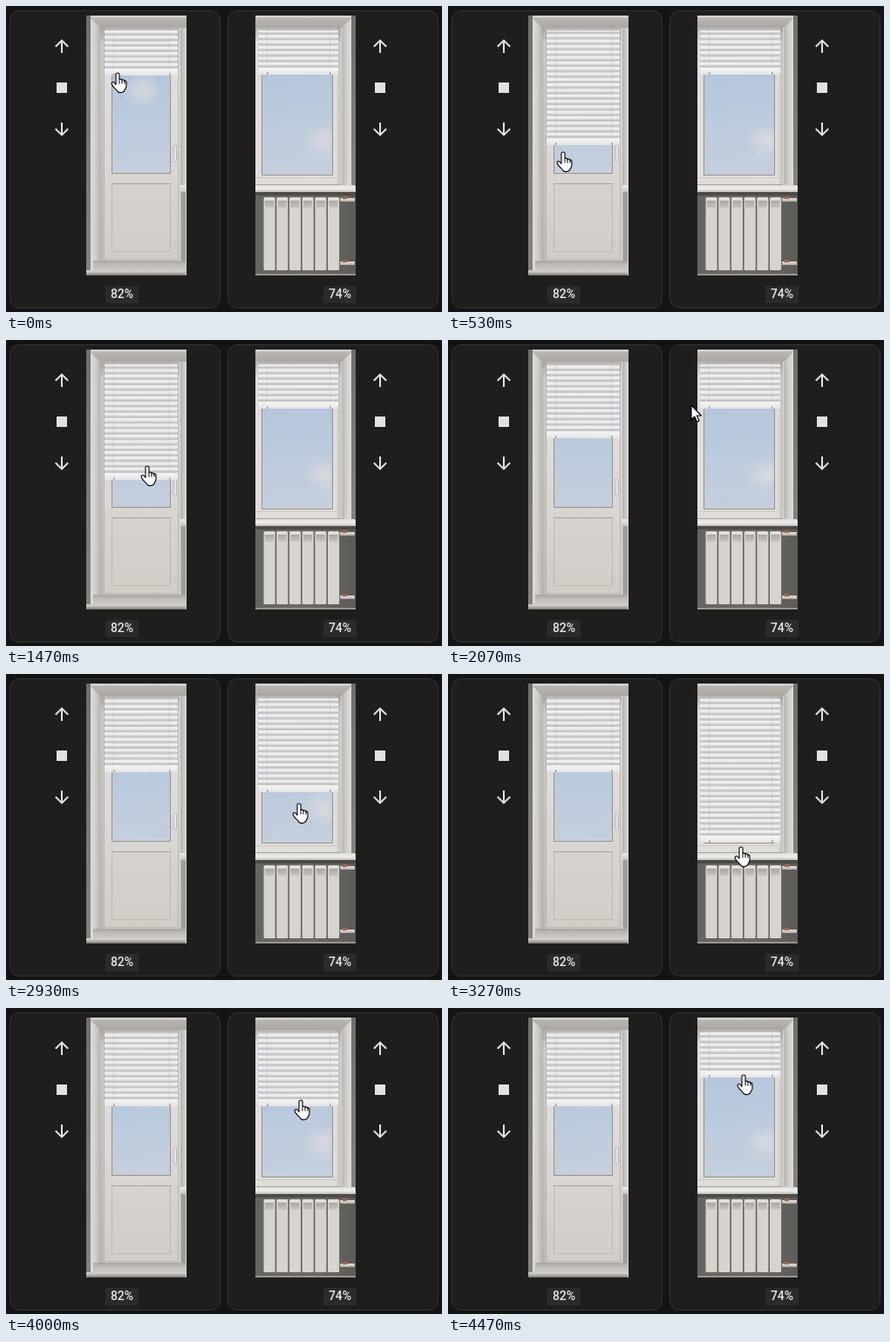
These frames come from a looping animation (500x352 px, 4590 ms). An HTML page with a canvas:

```html
<!DOCTYPE html>
<html lang="en">
<head>
<meta charset="utf-8">
<title>Window blinds</title>
<style>
  html, body { margin: 0; width: 100%; height: 100%; overflow: hidden; background: #141414; }
  canvas { display: block; width: 500px; height: 352px; }
</style>
</head>
<body>
<canvas id="stage" width="500" height="352"></canvas>
<script>
const ctx = document.getElementById('stage').getContext('2d');
const LOOP = 4590, FPS = 15;
const BLIND_TOP = 28, LAG = 30;
const LEFT_RELEASE = 1625, RIGHT_GRAB = 2740;

// Pointer stops; it eases from one to the next
const stops = [
  { t: 130, x: 128, y: 77 },
  { t: 1050, x: 137, y: 300 },
  { t: LEFT_RELEASE, x: 168, y: 110 },
  { t: 1750, x: 175, y: 74 },
  { t: 2280, x: 336, y: 75 },
  { t: RIGHT_GRAB, x: 336, y: 76 },
  { t: 3095, x: 336, y: 205 },
  { t: 4400, x: 339, y: 77 }
];

const clamp = (v, lo, hi) => Math.min(hi, Math.max(lo, v));
const smooth = u => u * u * (3 - 2 * u);

function pointerAt(t) {
  const next = stops.findIndex(s => s.t > t);
  if (next === 0) return stops[0];
  if (next < 0) return stops[stops.length - 1];
  const a = stops[next - 1], b = stops[next], s = smooth((t - a.t) / (b.t - a.t));
  return { x: a.x + (b.x - a.x) * s, y: a.y + (b.y - a.y) * s };
}

// A blind trails the pointer while it is held
function blindBottom(t, grab, release, limit) {
  return Math.round(Math.min(limit, pointerAt(clamp(t - LAG, grab, release)).y + 3));
}

function rect(x, y, w, h, fill) {
  ctx.fillStyle = fill;
  ctx.fillRect(x, y, w, h);
}

function outline(x, y, w, h, color) {
  ctx.strokeStyle = color;
  ctx.lineWidth = 1;
  ctx.strokeRect(x + .5, y + .5, w - 1, h - 1);
}

function ramp(x, y, w, h, dx, dy, ...colors) {
  const g = ctx.createLinearGradient(x, y, x + w * dx, y + h * dy);
  colors.forEach((c, i) => g.addColorStop(i / (colors.length - 1), c));
  rect(x, y, w, h, g);
}
const across = (x, y, w, h, ...colors) => ramp(x, y, w, h, 1, 0, ...colors);
const down = (x, y, w, h, ...colors) => ramp(x, y, w, h, 0, 1, ...colors);

function roundBox(x, y, w, h, r, fill, stroke) {
  ctx.beginPath();
  ctx.roundRect(x, y, w, h, r);
  ctx.fillStyle = fill;
  ctx.fill();
  if (!stroke) return;
  ctx.strokeStyle = stroke;
  ctx.lineWidth = 1;
  ctx.stroke();
}

function at(x, y, draw, scaleX = 1) {
  ctx.save();
  ctx.translate(x, y);
  ctx.scale(scaleX, 1);
  draw();
  ctx.restore();
}

function clipped(x, y, w, h, draw) {
  ctx.save();
  ctx.beginPath();
  ctx.rect(x, y, w, h);
  ctx.clip();
  draw();
  ctx.restore();
}

const arrowUp = new Path2D('M1 8H-1V-4L-6.5 1.5L-7.92 .08L0 -7.84L7.92 .08L6.5 1.5L1 -4Z');

function card(x, iconX, labelX, label) {
  roundBox(x + .5, 5.5, 241, 342, 11, '#1e1e1e', '#343434');
  ctx.fillStyle = '#e1e1e1';
  at(iconX, 46, () => ctx.fill(arrowUp));
  ctx.fillRect(iconX - 6, 88, 12, 12);
  at(iconX, 142, () => { ctx.rotate(Math.PI); ctx.fill(arrowUp); });
  roundBox(labelX - 19, 322, 38, 20, 2, '#2b2b2b');
  ctx.fillStyle = '#e6e6e6';
  ctx.font = '500 14px Roboto, sans-serif';
  ctx.textAlign = 'center';
  ctx.fillText(label, labelX, 336);
}

// Wall strip, reveal and inner shadows; the outer wall is on the left
function recess(height) {
  rect(0, 0, 115, height, '#d9d7d4');
  down(5, 0, 110, 3, '#dcdad7', '#c4c1bd');
  down(5, 3, 110, 11, '#b9b6b2', '#aaa7a2');
  ctx.beginPath();
  [[5, 3], [16, 14], [16, height], [5, height]].forEach(p => ctx.lineTo(...p));
  ctx.clip();
  across(5, 0, 11, height, '#dfddda', '#d0cdca', '#b9b6b2');
}

function wallStrip(height) {
  down(0, 0, 5, height, '#716f6b', '#85827d');
}

function innerShadow(x, y, w, h) {
  down(x, y, w, 18, 'rgba(80,76,70,.28)', 'rgba(80,76,70,0)');
  across(x, y, 6, h, 'rgba(80,76,70,.2)', 'rgba(80,76,70,0)');
}

function cloud(x, y, size) {
  for (let i = 0; i < 5; i++) {
    const px = x + Math.sin(i * 2.4) * size * .6, py = y + Math.cos(i * 2.4) * size * .45;
    const g = ctx.createRadialGradient(px, py, 0, px, py, size);
    g.addColorStop(0, 'rgba(222,220,223,.4)');
    g.addColorStop(1, 'rgba(222,220,223,0)');
    rect(px - size, py - size, size * 2, size * 2, g);
  }
}

function glass(x, y, w, h, cloudX, cloudY) {
  clipped(x, y, w, h, () => {
    ramp(x, y, w, h, .3, 1, '#b1c3db', '#b9c9dd', '#c5cfdc');
    cloud(cloudX, cloudY, 15);
  });
  outline(x, y, w, h, '#95918b');
}

function blind(x, w, bottom) {
  const pitch = 6.3, rail = bottom - 8;
  const cords = [x + 10, x + w - 10];
  clipped(x, BLIND_TOP, w, bottom - BLIND_TOP, () => {
    for (let y = rail - pitch; y > BLIND_TOP - pitch; y -= pitch) {
      down(x, y, w, pitch, '#f2f2f3', '#efeff0', '#e2e2e4', '#bebec1', '#d4d4d6');
    }
    cords.forEach(cx => rect(cx, BLIND_TOP, 1, rail - BLIND_TOP, 'rgba(150,150,155,.2)'));
    down(x, rail, w, 8, '#f3f3f3', '#eeeeee', '#e3e3e3');
  });
  cords.forEach(cx => rect(cx, bottom - 3, 1.5, 3, '#a8a49f'));
}

function door(bottom) {
  at(92, 11, () => {
    ctx.save();
    recess(299);
    ctx.restore();
    wallStrip(294);
  });
  across(200, 25, 6, 268, '#b5b2ae', '#d6d3d0');
  down(108, 25, 91, 268, '#dcdbda', '#d6d3cf', '#cbc7c2');
  down(112, 28, 86, 264, '#e2e1e0', '#dcd9d6', '#d0ccc7');
  outline(112, 28, 86, 264, '#bcb8b3');
  innerShadow(108, 25, 91, 268);
  glass(121, 40, 68, 153, 156, 97);
  down(121, 204, 68, 79, '#d6d2cd', '#d1cdc7');
  outline(121, 204, 68, 79, '#bdb9b3');
  rect(121, 204, 68, 1, '#a5a19b');
  roundBox(192, 160, 3.5, 19, 1.5, '#e6e4e1', '#b9b6b1');

  rect(201, 214, 5, 79, '#a19e99');
  down(200, 206, 6, 8, '#efeeec', '#c5c2be');
  down(100, 293, 106, 11, '#a9a6a1', '#c2bfbb', '#cccac6');
  down(92, 304, 114, 6, '#d9d6d2', '#b8b4ae', '#77736d');
  blind(113, 84, bottom);
}

function radiator() {
  across(286, 214, 115, 96, '#666460', '#6c6a66', '#5e5c58');
  rect(286, 214, 115, 4, '#4d4b48');
  rect(286, 308, 115, 2, '#98958f');
  for (const y of [223, 296]) {
    down(382, y - 2, 18, 4, '#e8e5e1', '#aeaaa5');
    rect(386, y - 4, 5, 3, '#a0664d');
  }
  const pitch = 14.7;
  rect(295, 221, pitch * 6, 82, '#5f5b56');
  for (let i = 0; i < 6; i++) {
    const x = 295.5 + i * pitch;
    roundBox(x, 220, 13.2, 84, 1.5, '#d7d3ce');
    rect(x + 1, 221, 11, 2, '#e5e2de');
    down(x + 1.5, 224, 10, 8, '#aaa6a1', '#c8c4bf');
  }
}

function windowPhoto(bottom) {
  at(401, 11, () => {
    ctx.save();
    recess(299);
    ctx.restore();
    wallStrip(196);
  }, -1);
  down(286, 25, 98, 181, '#dddcdb', '#dfddda', '#e0ddd9');
  at(384, 0, () => innerShadow(0, 25, 98, 181), -1);
  glass(293, 40, 82, 155, 363, 155);
  rect(286, 197, 98, 1, '#ccc9c5');
  rect(286, 205, 98, 1, '#a7a39f');
  radiator();
  down(286, 206, 114, 8, '#dedcd9', '#f0efed', '#c2bfba');
  blind(289, 92, bottom);
}

const hand = new Path2D('M-2 1.6C-2-.5 2-.5 2 1.6V8C2.5 6.6 5 6.8 5 8.6C5.6 7.4 8 7.8 8 9.6C8.6 8.6 10 9.2 10 11V15C10 18 8 19 7.5 21Q3.5 24 0 21.5C-1 19-5 17-6.5 13.5C-8 11-5 9.6-3.5 11.5L-2 13.4Z');
const arrow = new Path2D('M0 0V16.5L3.8 13L6.5 19L9 18L6.4 12H11.5Z');

function pointer({ x, y }) {
  const overGap = x > 202 && x < 289;
  const shape = overGap ? arrow : hand;
  ctx.fillStyle = '#fff';
  ctx.strokeStyle = '#000';
  ctx.lineWidth = 1.1;
  ctx.lineJoin = 'round';
  at(Math.round(x), Math.round(y), () => {
    ctx.fill(shape);
    ctx.stroke(shape);
    if (overGap) return;
    for (const knuckle of [2, 5, 8]) rect(knuckle - .5, 8.5, 1, 4, '#000');
  });
}

function render(now) {
  const step = Math.floor((now % LOOP + 5) * FPS / 1000);
  const t = step * 1000 / FPS;
  rect(0, 0, 500, 352, '#141414');
  card(4, 64, 133, '82%');
  card(254, 429, 383, '74%');
  door(blindBottom(t, 0, LEFT_RELEASE, 290));
  windowPhoto(blindBottom(t, RIGHT_GRAB, LOOP, 194));
  pointer(pointerAt(t));
}

const start = performance.now();
function tick() {
  render(performance.now() - start);
  requestAnimationFrame(tick);
}
tick();
</script>
</body>
</html>
```
